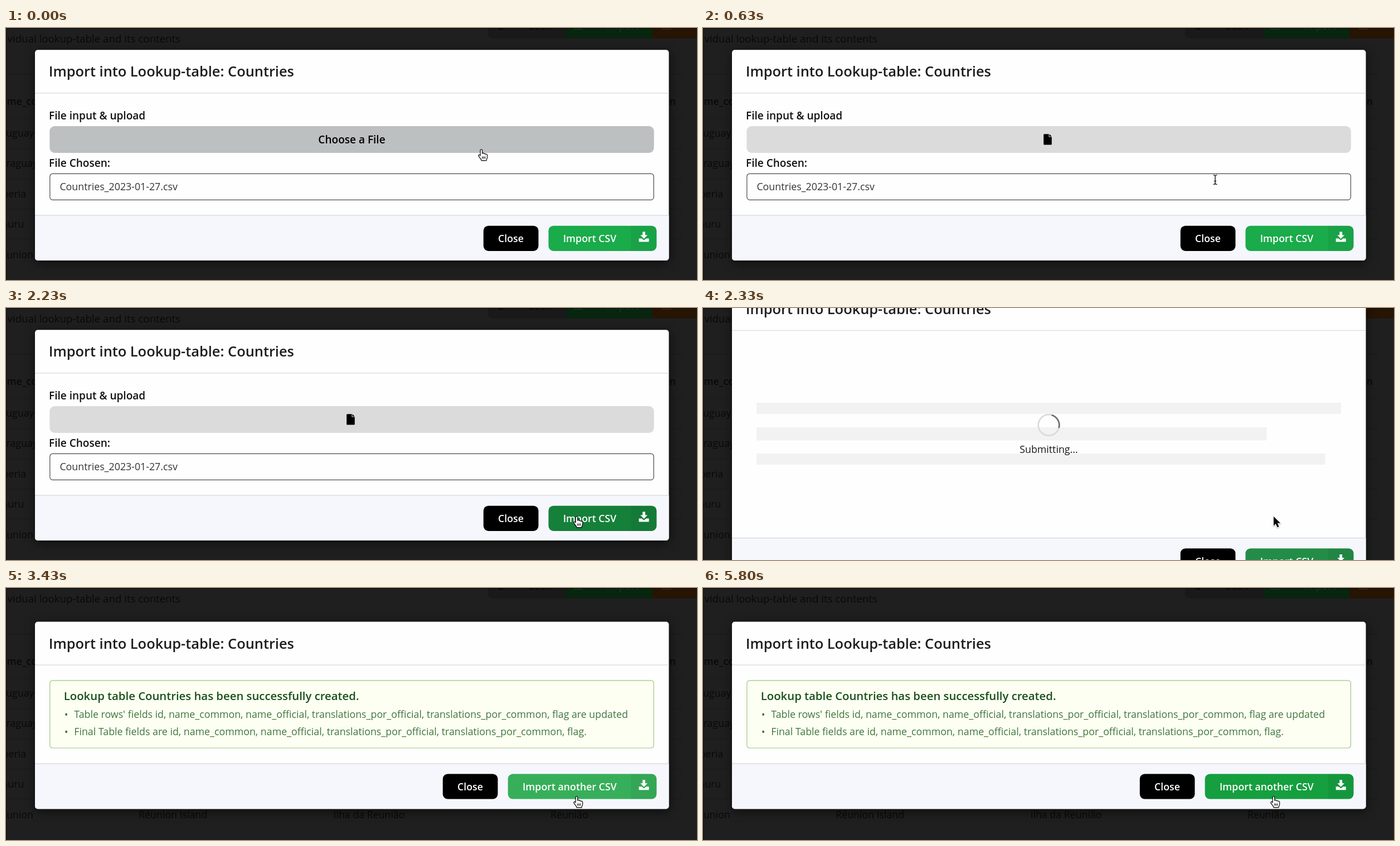
An HTML page with a canvas that plays this animation: 1240 px wide and 452 px high, repeating every 5.83 s.

```html
<!DOCTYPE html>
<html lang="en">
<head>
<meta charset="utf-8">
<title>Import into Lookup-table</title>
<style>
html, body { margin: 0; width: 100%; height: 100%; overflow: hidden; background: #1f1f1f; }
canvas { display: block; width: 1240px; height: 452px; }
</style>
</head>
<body>
<canvas id="stage" width="1240" height="452"></canvas>
<script>
const ctx = document.getElementById('stage').getContext('2d');
const LOOP = 5830, SUBMIT = 2310, DONE = 3380;
const BASE = 17.78, LABEL = 19.05, TITLE = 25.4, NOTICE = 20.32;
const GREEN = [26, 171, 75], HOVER = [21, 128, 58], BUSY = [90, 191, 119], FOCUS = [21, 159, 63];
const GREY_HOVER = [188, 192, 193], GREY = [219, 219, 220];

const clamp = v => Math.max(0, Math.min(1, v));
const ease = v => v * v * (3 - 2 * v);
const mix = (a, b, k) => `rgb(${a.map((v, i) => Math.round(v + (b[i] - v) * k))})`;

function text(str, x, y, size, color, weight = 400, align = 'left') {
  ctx.font = `${weight} ${size}px "Open Sans", sans-serif`;
  ctx.textAlign = align;
  ctx.fillStyle = color;
  ctx.fillText(str, x, y);
}

function rect(x, y, w, h, color) {
  ctx.fillStyle = color;
  ctx.fillRect(x, y, w, h);
}

function box(x, y, w, h, r, fill, stroke) {
  ctx.beginPath();
  ctx.roundRect(x, y, w, h, r);
  ctx.fillStyle = fill;
  ctx.fill();
  if (stroke) {
    ctx.strokeStyle = stroke;
    ctx.lineWidth = 1.2;
    ctx.stroke();
  }
}

// Pointer path: time, x, y of the hot spot
const path = [[0, 853, 218], [630, 919, 272], [1470, 1005, 346], [1800, 1024, 374]];

function slope(i, axis) {
  if (i === 0 || i === path.length - 1) return 0;
  const a = path[i - 1], b = path[i + 1];
  return (b[axis] - a[axis]) / (b[0] - a[0]);
}

function pointerAt(t) {
  const last = path.length - 1;
  if (t >= path[last][0]) return path[last].slice(1);
  let i = 0;
  while (t >= path[i + 1][0]) i++;
  const a = path[i], b = path[i + 1], d = b[0] - a[0], s = (t - a[0]) / d;
  return [1, 2].map(axis => {
    const m0 = slope(i, axis) * d, m1 = slope(i + 1, axis) * d;
    return a[axis] + (b[axis] - a[axis]) * ease(s)
      + m0 * s * (1 - s) ** 2 + m1 * s * s * (s - 1);
  });
}

function crossing(y) {
  let t = 0;
  while (pointerAt(t)[1] < y) t += 2;
  return t;
}
const LEAVE = crossing(224), ENTER = crossing(354);

const handShape = new Path2D('M-1.8 1.2C-1.8 -.7 1.7 -.7 1.7 1.2V7.2C2.3 6 4.8 6.1 5 7.8' +
  'C5.8 6.9 7.8 7.2 8 8.8C8.9 8 10.7 8.5 10.7 10.3V13.5C10.7 16 9.2 16.6 9 19.6H.2' +
  'C-.2 17 -2.6 15.4 -4.8 11.6C-5.9 9.6 -3.6 8.7 -2.4 10.2L-1.8 11Z');
const arrowShape = new Path2D('M0 0V16.4L3.8 12.9L6.6 19.3L9.6 18L6.8 11.8H12Z');
const beamShape = new Path2D('M-3.5 -8.5C-1.5 -8.5 0 -8 0 -6.5C0 -8 1.5 -8.5 3.5 -8.5' +
  'M0 -6.5V6.5M-3.5 8.5C-1.5 8.5 0 8 0 6.5C0 8 1.5 8.5 3.5 8.5M-2 2.5H2');

function pointer(t) {
  const [x, y] = pointerAt(t);
  const busy = t >= SUBMIT && t < DONE;
  ctx.save();
  ctx.translate(x, y);
  ctx.lineJoin = 'round';
  if (!busy && (y < 224 || y > 354)) {
    ctx.shadowColor = 'rgba(0,0,0,.3)';
    ctx.shadowBlur = 2;
    ctx.shadowOffsetY = 1;
    ctx.fillStyle = '#fff';
    ctx.fill(handShape);
    ctx.shadowColor = 'transparent';
    ctx.strokeStyle = '#111';
    ctx.lineWidth = 1.2;
    ctx.stroke(handShape);
    ctx.beginPath();
    for (const lx of [1.8, 4.2, 6.6]) {
      ctx.moveTo(lx, 12.4);
      ctx.lineTo(lx, 16.4);
    }
    ctx.stroke();
  } else if (!busy && y > 261 && y < 308) {
    ctx.strokeStyle = '#fff';
    ctx.lineWidth = 3;
    ctx.stroke(beamShape);
    ctx.strokeStyle = '#111';
    ctx.lineWidth = 1.4;
    ctx.stroke(beamShape);
  } else {
    ctx.shadowColor = 'rgba(0,0,0,.35)';
    ctx.shadowBlur = 2;
    ctx.shadowOffsetY = 1;
    ctx.strokeStyle = '#fff';
    ctx.lineWidth = 2;
    ctx.stroke(arrowShape);
    ctx.shadowColor = 'transparent';
    ctx.fillStyle = '#000';
    ctx.fill(arrowShape);
  }
  ctx.restore();
}

function backdrop() {
  const ink = '#090909';
  rect(0, 0, 1240, 452, '#1f1f1f');
  text('vidual lookup-table and its contents', 313, 26, 18.7, ink, 400, 'right');
  box(865, -30, 150, 48.5, 8, '#191919');
  rect(1005, -30, 155, 48.5, '#07250f');
  rect(1160, -30, 80, 48.5, '#271403');
  text('Back', 937, 3, BASE, ink, 600);
  text('Import', 1077, 3, BASE, '#14351f', 600);
  rect(884, 0, 8, 3, ink);
  rect(1018, 0, 17, 3, '#14351f');
  rect(1177, 0, 17, 3, '#3a2410');

  for (const y of [82, 162, 216, 270, 324, 378]) rect(0, y, 1214, 1, '#191919');
  text('name_common', -20, 138, BASE, ink, 600);
  text('translations_por_common', 1202, 138, BASE, ink, 600, 'right');
  ['Uruguay', 'Paraguay', 'Liberia', 'Nauru', 'Réunion'].forEach((name, i) =>
    text(name, -20, 195 + i * 54.4, BASE, ink));
  text('Réunion Island', 238, 412.6, BASE, ink);
  text('Ilha da Reunião', 587.5, 412.6, BASE, ink);
  text('Reunião', 977, 412.6, BASE, ink);
  rect(0, 0, 1240, 1, '#070707');
  rect(0, 0, 1, 452, '#0a0a0a');
}

function frame(top, foot, bottom) {
  ctx.save();
  ctx.shadowColor = 'rgba(0,0,0,.6)';
  ctx.shadowBlur = 18;
  ctx.shadowOffsetX = 1;
  ctx.shadowOffsetY = 4;
  box(52, top, 1137.5, bottom - top, 5, '#fdfefd');
  ctx.restore();
  box(52, foot, 1137.5, bottom - foot, [0, 0, 5, 5], '#f6f7fc');
  rect(52, foot - 0.5, 1137.5, 1.2, '#d3d5de');
  rect(52, top + 77, 1137.5, 1.2, '#d9dae0');
  text('Import into Lookup-table: Countries', 76.7, top + 48, TITLE, '#1d1d1f', 600);
}

function downloadIcon(x, y) {
  ctx.fillStyle = '#fff';
  ctx.beginPath();
  ctx.moveTo(x - 2.4, y - 9);
  ctx.lineTo(x + 2.4, y - 9);
  ctx.lineTo(x + 2.4, y - 3);
  ctx.lineTo(x + 6.4, y - 3);
  ctx.lineTo(x, y + 3.6);
  ctx.lineTo(x - 6.4, y - 3);
  ctx.lineTo(x - 2.4, y - 3);
  ctx.fill();
  ctx.beginPath();
  ctx.moveTo(x - 9, y + 3);
  ctx.lineTo(x - 4, y + 3);
  ctx.lineTo(x, y + 6.2);
  ctx.lineTo(x + 4, y + 3);
  ctx.lineTo(x + 9, y + 3);
  ctx.lineTo(x + 9, y + 9);
  ctx.lineTo(x - 9, y + 9);
  ctx.fill();
}

function importColor(t) {
  const fade = start => clamp((t - start) / 100);
  if (t >= DONE) return mix(BUSY, FOCUS, fade(DONE));
  if (t >= SUBMIT) return mix(HOVER, BUSY, fade(SUBMIT));
  return mix(GREEN, HOVER, fade(ENTER));
}

function buttons(foot, closeX, x, label, color) {
  const y = foot + 18.7, base = y + 29.4;
  box(closeX, y, 98.7, 45.2, 9, '#000');
  text('Close', closeX + 26.2, base, BASE, '#fff', 600);
  box(x, y, 1167.5 - x, 45.2, 9, color);
  box(1121.5, y, 46, 45.2, [0, 9, 9, 0], 'rgba(0,0,0,.05)');
  text(label, x + 26.2, base, BASE, '#fff', 600);
  downloadIcon(1144.7, y + 19.8);
}

function scaled(k, alpha, draw) {
  if (alpha <= 0) return;
  ctx.save();
  ctx.globalAlpha = alpha;
  ctx.translate(620.5, 200);
  ctx.scale(k, k);
  draw();
  ctx.restore();
}

function fileIcon() {
  ctx.fillStyle = '#000';
  ctx.beginPath();
  ctx.moveTo(-9.3, -8.5);
  ctx.quadraticCurveTo(-9.3, -9.7, -8, -9.7);
  ctx.lineTo(0, -9.7);
  ctx.lineTo(0, -4.4);
  ctx.lineTo(5.3, -4.4);
  ctx.lineTo(5.3, 8.3);
  ctx.quadraticCurveTo(5.3, 9.5, 4, 9.5);
  ctx.lineTo(-8, 9.5);
  ctx.quadraticCurveTo(-9.3, 9.5, -9.3, 8.3);
  ctx.fill();
  ctx.beginPath();
  ctx.moveTo(1, -9.7);
  ctx.lineTo(5.3, -5.4);
  ctx.lineTo(1, -5.4);
  ctx.fill();
}

function uploadForm(t) {
  const out = ease(clamp((t - LEAVE) / 300));
  frame(39.3, 336, 417);
  text('File input & upload', 77, 163.8, LABEL, '#111', 600);
  box(78.3, 176, 1084.5, 48, 9, mix(GREY_HOVER, GREY, clamp((t - LEAVE) / 100)));
  scaled(1 + out * 0.5, 1 - out, () =>
    text('Choose a File', 0, 7.2, LABEL, '#000', 600, 'center'));
  scaled(0.75 + out * 0.25, out, fileIcon);
  text('File Chosen:', 77, 248.8, LABEL, '#111', 600);
  box(78.8, 261.3, 1083.6, 47, 5, '#fdfefd', '#4a4a4a');
  text('Countries_2023-01-27.csv', 96.4, 291.3, BASE, '#333');
  buttons(336, 856.8, 973.5, 'Import CSV', importColor(t));
}

function submitting(t) {
  frame(-37.3, 412.5, 493);
  rect(96, 170, 1049, 20, '#f2f2f2');
  rect(96, 214, 915.5, 23.5, '#f2f2f2');
  rect(96, 261, 1020.5, 20, '#f2f2f2');
  const turn = (t - 2930) / 600 * Math.PI * 2 - 75 * Math.PI / 180;
  ctx.lineWidth = 2.6;
  for (const [from, to, color] of [[0, Math.PI * 2, '#dadada'], [turn, turn + Math.PI / 2, '#6b6b6b']]) {
    ctx.beginPath();
    ctx.arc(620.5, 210, 18.8, from, to);
    ctx.strokeStyle = color;
    ctx.stroke();
  }
  text('Submitting...', 620.5, 260, BASE, '#151515', 400, 'center');
  buttons(412.5, 856.8, 973.5, 'Import CSV', importColor(t));
}

function success(t) {
  const fields = 'id, name_common, name_official, translations_por_official, translations_por_common, flag';
  const ink = '#41753f';
  frame(60.5, 315, 396.2);
  box(78.8, 165.8, 1083.6, 121.2, 5, '#fcfff2', '#a0c48e');
  text('Lookup table Countries has been successfully created.', 103.8, 200.6, NOTICE, '#1a4f1b', 600);
  [`Table rows' fields ${fields} are updated`, `Final Table fields are ${fields}.`].forEach((line, i) => {
    const y = 233 + i * 30.5;
    text('•', 104.8, y, BASE, ink);
    text(line, 122.3, y, BASE, ink);
  });
  buttons(314.7, 783.8, 900.7, 'Import another CSV', importColor(t));
}

function draw(now) {
  const t = now % LOOP;
  backdrop();
  if (t < SUBMIT) uploadForm(t);
  else if (t < DONE) submitting(t);
  else success(t);
  pointer(t);
}

const start = performance.now();
function tick() {
  draw(performance.now() - start);
  requestAnimationFrame(tick);
}
tick();
</script>
</body>
</html>
```
